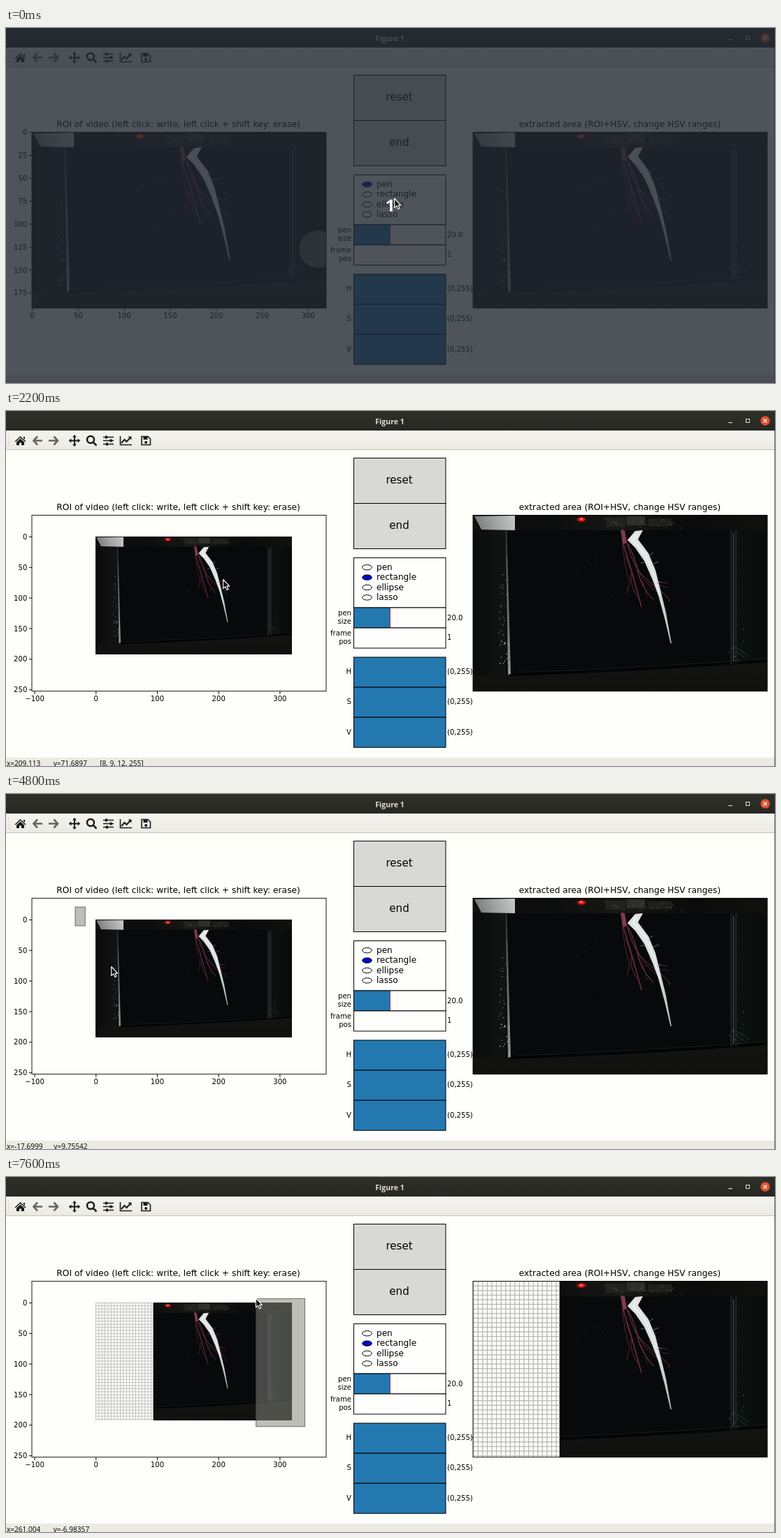
These frames come from a looping animation (1100 px wide and 509 px high, 8 s). An HTML page with a canvas:

```html
<!DOCTYPE html>
<html lang="en">
<head>
<meta charset="utf-8">
<title>Figure 1</title>
<style>
html, body { margin: 0; width: 100%; height: 100%; overflow: hidden; background: #fefefa; }
canvas { display: block; width: 1100px; height: 509px; }
</style>
</head>
<body>
<canvas id="stage" width="1100" height="509"></canvas>
<script>
const ctx = document.getElementById('stage').getContext('2d');
const PLOT = '"DejaVu Sans", sans-serif';
const UI = '"Open Sans", "Noto Sans", sans-serif';
const LEFT = 37, TOP = 149, WIDTH = 421, HEIGHT = 253, RIGHT_PANEL = 668;
const UNIT = WIDTH / 320;
const ZOOM_AT = [311, 242];
const MASK_COLS = 94, MASK_STEP = 5;
const BLUE = '#2478b0', INK = '#000';

// View of the left axes after `level` zoom-out clicks of factor 1.5
function viewAt(level) {
  const k = 1.5 ** -level;
  return {
    x: ZOOM_AT[0] - (ZOOM_AT[0] - LEFT) * k,
    y: ZOOM_AT[1] - (ZOOM_AT[1] - TOP) * k,
    k, s: UNIT * k
  };
}
const toPx = (v, x, y) => [v.x + (x + .5) * v.s, v.y + (y + .5) * v.s];
const toData = (v, x, y) => [(x - v.x) / v.s - .5, (y - v.y) / v.s - .5];
const zoomed = (x, y) => toPx(viewAt(1), x, y);

const DRAG_A = [99, 162], DRAG_B = zoomed(340.515, 202.254);
const END_A = zoomed(94.4513, 217.319), END_B = zoomed(261.004, -6.98357);
const REST = [209.113, 71.6897];

// Pointer path: time, x, y
const path = [
  [0, 556, 245], [300, 556, 245], [600, 516, 241], [900, 516, 241],
  [1200, 514.5, 238.5], [1500, 514.5, 238.5], [1800, ...ZOOM_AT], [3500, ...ZOOM_AT],
  [4200, 112, 172], [4300, 112, 172], [4500, ...DRAG_A], [4600, 99, 163],
  [4700, ...zoomed(-17.6999, 9.75542)], [4800, 151, 248], [5200, 201, 340],
  [5600, ...END_A], [5900, ...END_A], [6600, ...DRAG_B], [6700, 431, 356],
  [6800, 421, 345], [7500, ...END_B], [8000, ...END_B]
];

function pointer(t) {
  const i = Math.max(1, path.findIndex(p => p[0] >= t));
  const [t0, x0, y0] = path[i - 1], [t1, x1, y1] = path[i];
  const f = (t - t0) / (t1 - t0);
  return [x0 + (x1 - x0) * f, y0 + (y1 - y0) * f];
}

function zoomLevel(t) {
  const passed = list => list.filter(at => t >= at).length;
  return passed([2200, 2400, 2700]) - passed([3100, 3300]);
}

function rect(x, y, w, h, fill, stroke, line = 1) {
  if (fill) { ctx.fillStyle = fill; ctx.fillRect(x, y, w, h); }
  if (stroke) { ctx.strokeStyle = stroke; ctx.lineWidth = line; ctx.strokeRect(x, y, w, h); }
}

function text(str, x, y, size, align = 'left', family = PLOT, color = INK, weight = '') {
  ctx.font = `${weight} ${size}px ${family}`;
  ctx.textAlign = align;
  ctx.fillStyle = color;
  ctx.fillText(str, x, y);
}

function ellipse(x, y, rx, ry, fill, stroke) {
  ctx.beginPath();
  ctx.ellipse(x, y, rx, ry, 0, 0, 7);
  if (fill) { ctx.fillStyle = fill; ctx.fill(); }
  if (stroke) { ctx.strokeStyle = stroke; ctx.lineWidth = 1; ctx.stroke(); }
}

function shape(d, fill, stroke, line = 1) {
  const p = new Path2D(d);
  if (fill) { ctx.fillStyle = fill; ctx.fill(p); }
  if (stroke) { ctx.strokeStyle = stroke; ctx.lineWidth = line; ctx.stroke(p); }
}

function gradient(x0, y0, x1, y1, ...stops) {
  const g = ctx.createLinearGradient(x0, y0, x1, y1);
  stops.forEach((c, i) => g.addColorStop(i / (stops.length - 1), c));
  return g;
}

function random(seed) {
  return () => (seed = (seed * 16807) % 2147483647) / 2147483647;
}

function specks(seed, n, x, y, w, h, color) {
  const rnd = random(seed);
  ctx.fillStyle = color;
  for (let i = 0; i < n; i++) ctx.fillRect(x + rnd() * w, y + rnd() * h, 1 + rnd(), 1 + rnd());
}

function tank() {
  rect(0, 0, WIDTH, HEIGHT, '#07090b');
  rect(0, 22, 47, 208, gradient(0, 0, 47, 0, '#0a0c0b', '#101413'));
  rect(378, 22, 43, 190, gradient(378, 0, 421, 0, '#0c110f', '#080b0a'));

  shape('M0 230L54 229L421 209V253H0Z', gradient(0, 205, 0, 253, '#141513', '#10110f'));
  shape('M54 229Q250 222 421 209', null, '#030404', 4);
  shape('M62 226Q250 219 421 206', null, '#171b19');

  rect(0, 0, WIDTH, 22, gradient(0, 0, WIDTH, 0, '#11120f', '#0b0c0c', '#181815', '#0a0b0a', '#11120f'));
  shape('M2 2L60 1V22L12 21Z', gradient(0, 22, 60, 0, '#6d706e', '#9fa2a0', '#c6c9c7'));
  rect(190, 4, 28, 13, '#22221f');
  rect(220, 2, 26, 13, '#2e2e2a');
  rect(250, 5, 34, 11, '#1f1f1b');
  specks(9, 24, 188, 3, 110, 15, '#45453f');

  ellipse(155, 6.5, 9, 4.5, 'rgba(130,10,10,.4)');
  ellipse(155, 6.5, 5.5, 3, '#d51f1c');
  ellipse(155, 6, 2.2, 1.2, '#ff7868');

  shape('M46.5 22L48.5 22L54 228L50 229Z', gradient(0, 22, 0, 229, '#2c3432', '#414a46', '#5c6661', '#8a938c'));
  shape('M48 60L53 228', null, 'rgba(175,188,180,.45)', .8);
  specks(5, 22, 36, 80, 16, 135, '#59625c');
  specks(14, 14, 38, 180, 15, 38, '#a5aea4');

  rect(368, 22, 3, 192, '#161e1a');
  rect(372, 26, 1.5, 184, '#3f4b45');
  rect(375, 22, 2.5, 190, '#1b2420');
  shape('M374 189L396 203M376 196L390 206', null, '#2a342f', 1);
  specks(21, 12, 366, 160, 26, 48, '#39443e');
  specks(33, 6, 150, 50, 60, 100, '#242928');
}

function plant() {
  const red = '#7c3049';
  shape('M214 20Q212 34 218 52T229 88T241 132', null, red, 1.3);
  shape('M216 24Q222 50 230 68T262 104T280 125', null, red, 1);
  shape('M213 32Q216 72 224 96L220 113', null, '#592234', 1);
  shape('M222 42Q233 64 236 82T258 122', null, '#8f3b55', 1);
  shape('M232 70Q242 96 266 112M252 86Q264 99 278 97M226 84Q224 103 238 121', null, red, .8);
  shape('M236 86Q246 98 249 118M218 58Q226 78 233 104M262 98Q268 104 281 104', null, '#5f273a', .8);
  shape('M211 22L217 22L220 40L215 42Z', '#7f3a50');

  shape('M232 23L243 22L236 35L251 55L261 79L268 107L276 140L284 184L282.5 184' +
    'L274 148L265 115L256 91L245 66L232 47L221 36Z', gradient(230, 22, 283, 184, '#e2e5e3', '#d7dddb', '#a9bfc2'));
  shape('M234 27L229 36L246 56L259 86L267 116', null, 'rgba(255,255,255,.5)', 2);
  shape('M252 58l6 -4M258 70l8 -3M245 68l-5 1M263 98l6 -2', null, '#7d8685', .8);
}

// Video still: a root hanging in a dark tank, 421 x 253 units
function photo(x, y, k, masked) {
  const w = Math.round(x + WIDTH * k) - Math.round(x);
  const h = Math.round(y + HEIGHT * k) - Math.round(y);
  ctx.save();
  ctx.translate(Math.round(x), Math.round(y));
  ctx.scale(w / WIDTH, h / HEIGHT);
  ctx.beginPath();
  ctx.rect(0, 0, WIDTH, HEIGHT);
  ctx.clip();
  tank();
  plant();
  if (masked) mask();
  ctx.restore();
}

function mask() {
  const w = MASK_COLS * UNIT;
  rect(0, 0, w, HEIGHT, '#fefefc');
  ctx.fillStyle = '#b9b9b4';
  for (let i = 0; i < MASK_COLS; i += MASK_STEP) ctx.fillRect(i * UNIT, 0, UNIT, HEIGHT);
  for (let i = 0; i < 192; i += MASK_STEP) ctx.fillRect(0, i * UNIT, w, UNIT);
}

function windowFrame() {
  rect(0, 0, 1100, 509, '#fefefa');
  rect(0, 0, 1100, 28, gradient(0, 0, 0, 28, '#30302b', '#272723'));
  text('Figure 1', 549, 18.5, 10.6, 'center', UI, '#dfdbd2', 'bold');
  rect(1033.5, 16, 5.5, 1.2, '#dfdbd2');
  rect(1058.5, 11.5, 5, 5, null, '#dfdbd2');
  ellipse(1086, 14, 6.7, 6.7, '#e2502b');
  shape('M1083.5 11.5l5 5m0 -5l-5 5', null, '#fff', 1.1);
  rect(0, 28, 1100, 27, gradient(0, 28, 0, 55, '#f5f4ef', '#ebeae2'));
  rect(0, 55, 1100, 1, '#c6c4b8');
  rect(0, 497, 1100, 12, '#ebebe3');
  for (let y = 34; y < 50; y += 3) rect(3, y, 1, 1, '#c4c2b8');
  toolbar();
}

function toolbar() {
  const ink = '#1b1b1b', gray = '#666';
  shape('M12.5 43.5L20.5 36L28.5 43.5L27.5 44.5L20.5 38L13.5 44.5Z', ink);
  shape('M25 37h2v4l-2 -2ZM15 44.5L20.5 39.5L26 44.5V49H22V45.5H19V49H15Z', ink);
  shape('M52 42.5H40M45 36.5L39.5 42.5L45 48.5', null, gray, 2.6);
  shape('M61 42.5H73M68.5 36.5L74 42.5L68.5 48.5', null, gray, 2.6);
  shape('M98 37V48M92.5 42.5H103.5', null, ink, 2);
  shape('M98 34l3 3.6h-6ZM98 51l3 -3.6h-6ZM89.7 42.5l3.6 -3v6ZM106.3 42.5l-3.6 -3v6Z', ink);
  shape('M126 41a5 5 0 1 1 -10 0a5 5 0 1 1 10 0M125 45L129.5 49.5', null, ink, 2.5);
  shape('M139 37.5H154M139 42.5H154M139 47.5H154', null, ink, 1.5);
  shape('M142 35.5h3v4h-3ZM148.5 40.5h3v4h-3ZM143 45.5h3v4h-3Z', ink);
  shape('M163.5 36V48.5H180', null, ink, 1.6);
  shape('M165 46L169.5 41L172.5 44L178 38', null, ink, 2);
  shape('M174.5 36.5h5v5Z', ink);
  shape('M194 36.5H203L206.5 40V48.5H194Z', null, ink, 1.6);
  shape('M196.5 37h6v4h-6Z', ink);
  ellipse(200.2, 45, 2, 2, ink);
}

function widgets(selected) {
  const x = 497.5, w = 131.5;
  rect(x, 67.5, w, 65, '#d8d9d5', INK);
  rect(x, 132.5, w, 65, '#d8d9d5', INK);
  text('reset', 562.5, 104, 15.1, 'center');
  text('end', 562.5, 168.5, 15.1, 'center');

  rect(x, 210.5, w, 71.5, '#fefefc', INK);
  ['pen', 'rectangle', 'ellipse', 'lasso'].forEach((name, i) => {
    const y = 224.2 + i * 14.4;
    ellipse(516.5, y, 6.8, 3.7, name === selected ? '#0404d0' : '#fefefc', INK);
    text(name, 530, y + 3.6, 12.1);
  });

  rect(x, 282, w, 29, '#fefefc');
  rect(x, 282, 52, 29, BLUE);
  rect(549, 282, 1, 29, '#b03048');
  rect(x, 282, w, 29, null, INK);
  rect(x, 311, w, 29, '#fefefc', INK);
  text('pen', 494, 293, 10.1, 'right');
  text('size', 494, 305, 10.1, 'right');
  text('frame', 494, 321.5, 10.1, 'right');
  text('pos', 494, 333.5, 10.1, 'right');
  text('20.0', 631, 299.5, 10.1);
  text('1', 631, 328, 10.1);

  ['H', 'S', 'V'].forEach((name, i) => {
    const y = 353 + i * 43.1;
    rect(x, y, w, 43.1, BLUE, INK);
    text(name, 494, y + 24.3, 10.1, 'right');
    text('(0,255)', 631, y + 24.3, 10.1);
  });
}

function eachTick(from, span, draw) {
  const step = [25, 50, 100, 200].find(s => span / s <= 9);
  for (let n = Math.ceil(from / step) * step; n <= from + span; n += step)
    draw(n, String(n).replace('-', '\u2212'));
}

function frame(x) {
  rect(x, TOP + .4, WIDTH, HEIGHT - .7, null, INK, .9);
}

function axes(view) {
  const [x0, y0] = toData(view, LEFT, TOP);
  eachTick(x0, WIDTH / view.s, (n, label) => {
    const x = toPx(view, n, 0)[0];
    rect(x - .5, TOP + HEIGHT, 1, 4, INK);
    text(label, x, 416, 10.1, 'center');
  });
  eachTick(y0, HEIGHT / view.s, (n, label) => {
    const y = toPx(view, 0, n)[1];
    rect(LEFT - 4, y - .5, 4, 1, INK);
    text(label, 30.3, y + 3.5, 10.1, 'right');
  });
  frame(LEFT);
}

function clipAxes(draw) {
  ctx.save();
  ctx.beginPath();
  ctx.rect(LEFT, TOP, WIDTH, HEIGHT);
  ctx.clip();
  draw();
  ctx.restore();
}

function status(x, y) {
  const field = v => String(+v.toPrecision(6)).padEnd(12);
  let line = `x=${field(x)}  y=${field(y)}`;
  if (x > -.5 && x < 319.5 && y > -.5 && y < 191.5) {
    const n = Math.floor(x + y) % 5;
    line += `  [${8 + n}, ${9 + n}, ${12 + n}, 255]`;
  }
  text(line, 1, 508.5, 10.1, 'left', UI);
}

function arrow(x, y) {
  ctx.save();
  ctx.translate(x - .3, y - .5);
  ctx.lineJoin = 'round';
  shape('M0 0V13L3 10.3L5.2 15L7.3 14L5.3 9.6H9Z', '#111', '#fff', 1.1);
  ctx.restore();
}

function selection(a, b) {
  rect(a[0], a[1], b[0] - a[0], b[1] - a[1], 'rgba(132,132,126,.52)', 'rgba(70,70,68,.75)');
}

function draw(now) {
  const t = Math.floor((now % 8000) / 100) * 100;
  const view = viewAt(zoomLevel(t));
  const masked = t >= 6000;
  const tip = pointer(t);
  // Events reach the figure one step after the pointer moves
  const event = pointer(t >= 1800 && t < 2000 ? 1700 : Math.max(0, t - 100));

  windowFrame();
  widgets(t < 1400 ? 'pen' : 'rectangle');
  text('ROI of video (left click: write, left click + shift key: erase)', 246.6, 142.3, 12.28, 'center');
  text('extracted area (ROI+HSV, change HSV ranges)', 878, 142.3, 12.24, 'center');

  clipAxes(() => {
    photo(view.x, view.y, view.k, masked);
    if (t < 1400) ellipse(446, 317, 26.3, 26.3, 'rgba(150,150,144,.55)', 'rgba(110,110,106,.7)');
    if (t >= 4700 && t < 6000) selection(DRAG_A, event);
    if (t >= 6800) selection(DRAG_B, event);
  });
  axes(view);
  photo(RIGHT_PANEL, TOP, 1, masked);
  frame(RIGHT_PANEL);
  if (t >= 2000 && t < 3600) status(...REST);
  else if (t >= 1700) status(...toData(view, ...event));
  rect(1099, 28, 1, 481, 'rgba(60,60,56,.7)');

  if (t < 100) {
    rect(0, 0, 1100, 509, 'rgba(36,41,50,.8)');
    text('1', 549.5, 263, 24, 'center', UI, '#fff', 'bold');
  }
  arrow(...tip);
}

function loop() {
  draw(performance.now());
  requestAnimationFrame(loop);
}
loop();
</script>
</body>
</html>
```
